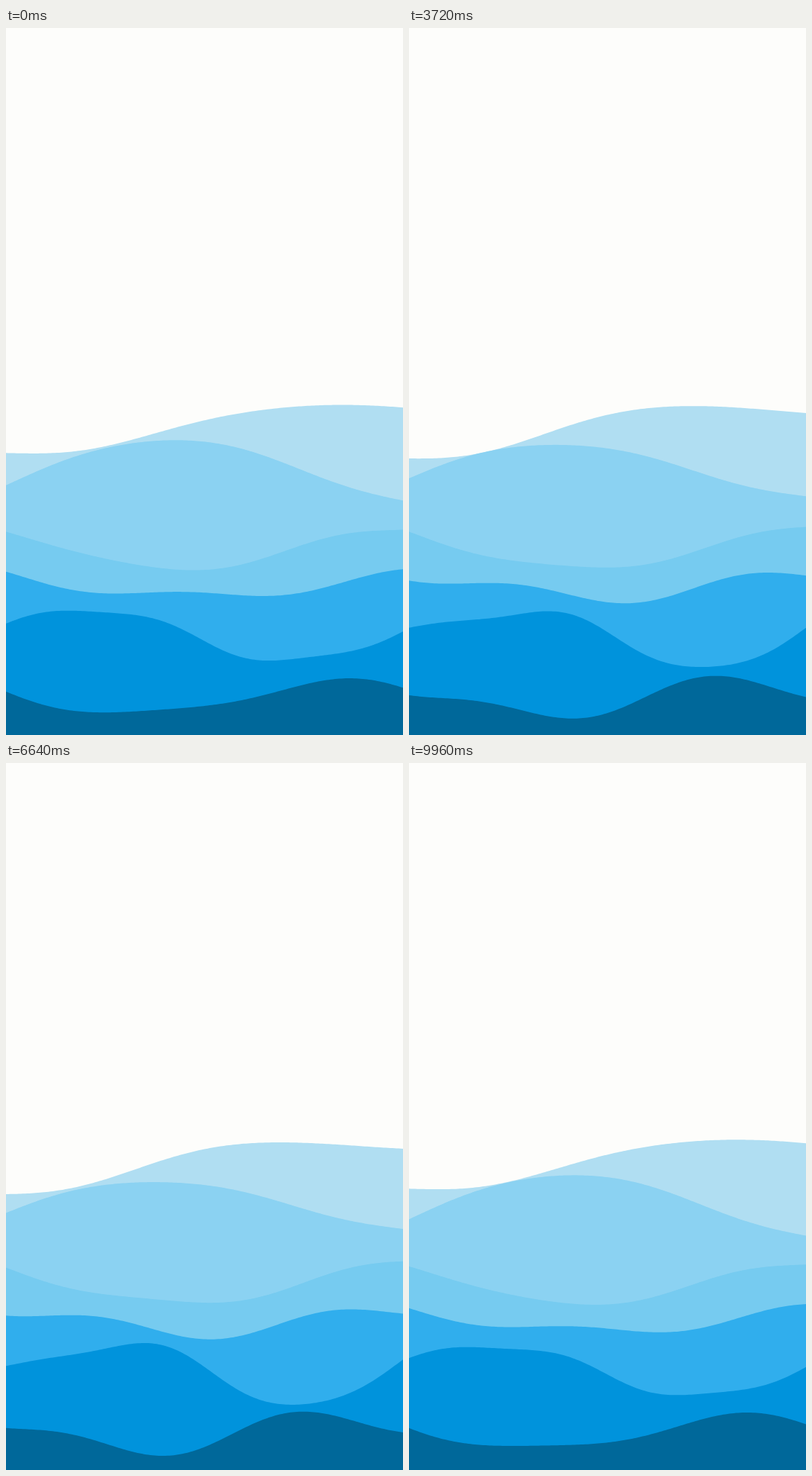
Animation, 561 px wide and 997 px high, one loop 10000 ms. Source, as an HTML page:

```html
<!DOCTYPE html>
<html lang="en">
<head>
<meta charset="utf-8">
<title>Waves</title>
<style>
  html, body { margin: 0; width: 100%; height: 100%; overflow: hidden; background: #fdfdfb; }
  svg { display: block; width: 100%; height: 100%; }
</style>
</head>
<body>
<svg viewBox="0 0 561 997" preserveAspectRatio="none"></svg>
<script>
const W = 561, H = 997, STEP = 3;
const PERIOD = 1000, TICK = 40;

// Each layer is a hill line with a sine swell running right, once per second.
// left, right: edge heights; bends: strength of each half-wave between them;
// swell: height, length and phase of the running sine.
const layers = [
  { fill: '#b0def2', left: 603, right: 539, bends: [-17.5, 9, 4, 1], swell: [5, 565, .62] },
  { fill: '#8bd2f2', left: 641, right: 660, bends: [-59, -9, 2, -2], swell: [6.5, 690, .15] },
  { fill: '#76cbf0', left: 712, right: 705, bends: [49, 7, -6, 4], swell: [2.7, 330, .36] },
  { fill: '#30aeed', left: 770.5, right: 772, bends: [29, 2.5, -4], swell: [9, 313, .68] },
  { fill: '#0093dc', left: 848, right: 843, bends: [17, -42, 2, 5, 0, -3], swell: [9, 376, .43] },
  { fill: '#00689a', left: 933, right: 935, bends: [19, 22, -4, -2.5], swell: [9, 301, .8] }
];

const svg = document.querySelector('svg');
for (const layer of layers) {
  layer.path = document.createElementNS('http://www.w3.org/2000/svg', 'path');
  layer.path.setAttribute('fill', layer.fill);
  svg.append(layer.path);
}

function height({ left, right, bends, swell: [amp, length, phase] }, x, cycle) {
  const u = x / W;
  const hill = bends.reduce((sum, b, i) => sum + b * Math.sin((i + 1) * Math.PI * u),
    left + (right - left) * u);
  return hill + amp * Math.cos(2 * Math.PI * (cycle - phase - x / length));
}

function draw(cycle) {
  for (const layer of layers) {
    let d = `M0,${H}`;
    for (let x = 0; x <= W; x += STEP) d += `L${x},${height(layer, x, cycle).toFixed(2)}`;
    layer.path.setAttribute('d', `${d}L${W},${H}Z`);
  }
}

let start;
function frame(now) {
  start ??= now;
  const time = Math.floor((now - start) / TICK) * TICK;
  draw(time % PERIOD / PERIOD);
  requestAnimationFrame(frame);
}
draw(0);
requestAnimationFrame(frame);
</script>
</body>
</html>
```
